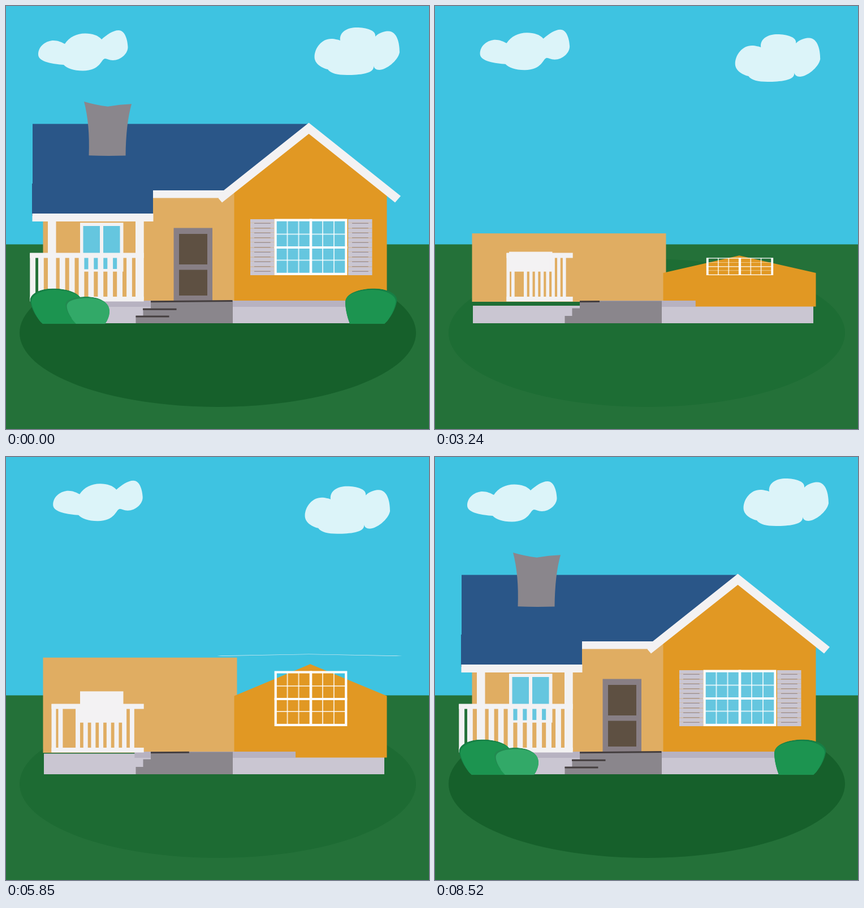
An HTML page with a canvas for the animation above (8.91 s loop, 748 by 748 pixels).

```html
<!DOCTYPE html>
<html lang="en">
<head>
<meta charset="utf-8">
<title>House</title>
<style>
html, body { margin: 0; width: 100%; height: 100%; overflow: hidden; background: #3ec3e1; }
canvas { display: block; }
</style>
</head>
<body>
<canvas id="stage" width="748" height="748"></canvas>
<script>
const ctx = document.getElementById('stage').getContext('2d');
const LOOP = 8910, STEP = 30;
const WHITE = '#f3f2f3', ROOF = '#2a5688', GLASS = '#65c6df', STONE = '#8a868c', BROWN = '#5e5042';

let now = 0; // build time: 0 is the empty lawn

const mix = (a, b, p) => a + (b - a) * p;
const lin = (from, to) => Math.min(1, Math.max(0, (now - from) / (to - from)));
const ease = (from, to) => (1 - Math.cos(Math.PI * lin(from, to))) / 2;

function box(color, l, t, r, b) {
  ctx.fillStyle = color;
  ctx.fillRect(l, t, r - l, b - t);
}

function poly(color, ...pts) {
  ctx.fillStyle = color;
  ctx.beginPath();
  for (let i = 0; i < pts.length; i += 2) ctx.lineTo(pts[i], pts[i + 1]);
  ctx.fill();
}

function shape(d) { return new Path2D(d); }

// Draw scaled about a fixed point
function scaled(x, y, sx, sy, draw) {
  if (sx <= 0 || sy <= 0) return;
  ctx.save();
  ctx.translate(x, y);
  ctx.scale(sx, sy);
  ctx.translate(-x, -y);
  draw();
  ctx.restore();
}

const cloudL = shape('M57 86C57 70 72 61 84 61C92 61 98 64 104 67C112 55 125 48.5 140 48.5C153 48.5 163 52 169 59C178 51 189 43 199 43C211 43 215 61 215.5 72C216 84 203 96 189 96C182 96 179 93 175 93C168 94 167 114.5 136 114.5C119 114.5 108 110 102 104C85 103 57 99 57 86Z');
const cloudR = shape('M545.5 90C546 73 559 58 575 58C582 58 588 60 591 61C589 45 605 38 620 38C637 38 655 43 653 54C660 47 669 44.5 676 44.5C692 45 696 66 696 82C693 97 672 113 660 113C654 113 651 110 650 106C652 120 624 122 603 122C586 122 574 119 569 112C556 109 545.5 101 545.5 90Z');
const bushBig = shape('M608 562C603 549 600 535 600 524C600 507 626 499.5 652 499.5C678 500 693 511 691.5 522C689 536 680 553 669 562Z');
const bushSmall = shape('M124 562C113 551 105 538 105 528C105 518 122 514 142 514C164 514 183 523 183 540C183 550 178 558 175 562Z');

function cloud(path, dx, dy) {
  ctx.save();
  ctx.translate(dx, dy);
  ctx.fillStyle = '#dcf4f9';
  ctx.fill(path);
  ctx.restore();
}

function scenery() {
  box('#3ec3e1', 0, 0, 748, 748);
  box('#247139', 0, 421.5, 748, 748);
  const p = lin(400, 2900);
  ctx.fillStyle = `rgb(${mix(33, 22, p)},${mix(115, 96, p)},${mix(56, 43, p)})`;
  ctx.beginPath();
  ctx.ellipse(374.5, 578, 350.5, 131, 0, 0, 7);
  ctx.fill();

  const a = 30 * ease(0, 1815) * (1 - ease(1815, 3630));
  cloud(cloudL, a < 0 ? 0 : now < 1815 ? 30 * ease(0, 1815) : 30 * (1 - ease(1815, 3630)), -a * 0.05);
  const c = 24.8 * (lin(0, 2043) - lin(2043, 3763));
  cloud(cloudR, -c, c * 0.81);
}

function walls() {
  box('#cac6d2', 67, 561 - 38 * ease(377, 1544), 669, 561);
  const wall = ease(611, 1687);
  box('#e0ad62', 65.5, 523 - 203 * wall, 408.5, 523);

  const roof = ease(1600, 2170);
  scaled(291, 326, 1.125 - 0.125 * roof, roof, () =>
    poly(ROOF, 47, 208.5, 535, 208.5, 388, 326, 47, 326));
  box(ROOF, 46, 314, 46 + 214 * ease(1823, 2823), 371);

  scaled(538, 531.5, 1, ease(802, 1945), () =>
    poly('#e19823', 403.5, 531.5, 403.5, 325.5, 538, 219.5, 673.5, 325.5, 673.5, 531.5));

  const strip = 303.5 * ease(617, 2237);
  box('#b7b2c1', 369.7 - strip, 521, 369.7 + strip, 532);
}

function stairs() {
  const p = ease(65, 965);
  scaled(315.4, 561, 0.75 + 0.25 * p, p, () =>
    poly(STONE, 229.5, 561, 229.5, 548, 242.5, 548, 242.5, 534.5, 256, 534.5, 256, 521.5, 401, 521.5, 401, 561));
}

function treads() {
  const tread = (x, y, w, rise, p) => {
    if (!p) return;
    ctx.strokeStyle = '#443e3f';
    ctx.lineWidth = 3;
    ctx.beginPath();
    ctx.moveTo(x, y);
    ctx.lineTo(x + w * p, y - rise * p);
    ctx.stroke();
  };
  tread(256, 522.8, 144.5, 1.2, ease(830, 2006));
  tread(242, 536.2, 59.5, 0, ease(1460, 2460));
  tread(229.5, 549, 59, 0, ease(2300, 2850));
}

function eaves() {
  box(WHITE, 388 - 128 * ease(1765, 2865), 326, 388, 339.5);
  const p = ease(1325, 2025);
  ctx.save();
  ctx.translate(0, 4.5 * (1 - p));
  scaled(536.5, 347.5, 1.015 - 0.015 * p, p, () =>
    poly(WHITE, 535.5, 206.5, 698, 336, 688, 347.5, 535.5, 226, 382, 347.5, 375.5, 340, 385, 326));
  ctx.restore();
  box(WHITE, 46.5, 381 - 14 * ease(2050, 2850), 260.5, 381);
}

function chimney() {
  const top = 265 - 90 * ease(2150, 3561), k = ease(2900, 4065);
  if (top > 264.9) return;
  const waist = mix(top, 265, 0.35);
  ctx.fillStyle = STONE;
  ctx.beginPath();
  ctx.moveTo(146.5, 264.3);
  ctx.quadraticCurveTo(147.5 + k, waist + 2, 147 - 9 * k, top - 6 * k);
  ctx.quadraticCurveTo(160 - 2 * k, top - 1 + k, 180, top + 2.8 * k);
  ctx.quadraticCurveTo(200 + k, top - 1, 211 + 11 * k, top + 0.8 - 2.5 * k);
  ctx.quadraticCurveTo(211 + k, waist + 2, 211.5, 264.5);
  ctx.quadraticCurveTo(178, 265.5, 146.5, 264.3);
  ctx.fill();
}

function bigWindow() {
  const p = ease(1089, 1425), g = ease(1500, 2200);
  if (g) for (const [l, r] of [[477, 538], [540, 601]]) box(GLASS, l, 474 - 95 * g, r, 474);
  scaled(539, 476, 0.88 + 0.12 * p, p, () => {
    const thin = 'rgba(255,255,255,.75)', bold = '#fdfdfd';
    for (const x of [497.5, 517.5, 560, 580]) box(thin, x - 1, 378, x + 1, 474);
    for (const y of [403.5, 449.5]) box(thin, 476, y - 1, 602, y + 1);
    box(bold, 536.7, 376.5, 541.3, 476);
    box(bold, 474.5, 425, 603.5, 429);
    ctx.strokeStyle = bold;
    ctx.lineWidth = 4.2;
    ctx.strokeRect(476.6, 378.6, 124.8, 95.3);
  });
}

function shutter(x) {
  const p = ease(1500, 2420);
  scaled(x, 377, p, 1, () => {
    let y = 377;
    for (let i = 0; i <= 11; i++) {
      const slat = i < 11 ? 383.7 + 8.5 * i : 476;
      box('#cac6d2', x, y, x + 42.5, slat);
      if (i < 11) {
        box('#cac6d2', x, slat, x + 7, slat + 1.3);
        box('#cac6d2', x + 35.5, slat, x + 42.5, slat + 1.3);
        box(now >= 2350 + 70 * i ? '#9791a0' : '#e19823', x + 7, slat, x + 35.5, slat + 1.3);
      }
      y = slat + 1.3;
    }
  });
}

function door() {
  box('#887f85', 296.5, 521 - 128.5 * ease(2150, 2800), 365, 521);
  box(BROWN, 306, 512 - 45.5 * ease(2480, 2880), 356, 512);
  box(BROWN, 306, 457 - 54 * ease(2895, 3500), 356, 457);
}

function porch() {
  box(WHITE, 131, 469.7 - 86.5 * ease(687, 1887), 207.5, 469.7);
  box(GLASS, 136.5, 389, 166, 389 + 76.5 * ease(1815, 2715));
  box(GLASS, 172, 465 - 76 * ease(2650, 3500), 201.5, 465);

  const col = 141 * ease(1650, 2750);
  box(WHITE, 74, 520 - col, 88.5, 520);
  box(WHITE, 229, 520 - col, 243.7, 520);

  scaled(243.7, 480, ease(595, 1717), 1, () => {
    box(WHITE, 42.3, 436.5, 243.7, 445.5);
    box(WHITE, 42.3, 514, 243.7, 522.5);
    for (const x of [42.3, 57]) box(WHITE, x, 437, x + 9.8, 522);
    for (let i = 0; i < 8; i++) {
      const x = 94.8 + 16.9 * i;
      box(WHITE, x, 437, x + 9.8, 522);
    }
  });
}

// Squash and stretch: flat and wide, then tall, then at rest
function bush(path, cx, start, pace, fill, edge, dx) {
  const u = (now - start) / pace;
  if (u <= 0) return;
  const part = (a, b) => (1 - Math.cos(Math.PI * Math.min(1, Math.max(0, (u - a) / (b - a))))) / 2;
  const tall = 1.39 * part(-0.1, 0.88) - 0.39 * part(0.9, 1.3);
  const wide = 1.14 - 0.15 * part(0, 0.9) + 0.01 * part(0.9, 1.3);
  ctx.save();
  ctx.translate(0, Math.max(0, wide - 1) * 14);
  scaled(cx, 561.5, wide, tall, () => {
    ctx.clip(path);
    ctx.fillStyle = edge;
    ctx.fill(path);
    ctx.translate(dx, 2.6);
    ctx.fillStyle = fill;
    ctx.fill(path);
    ctx.fillRect(cx - 32, 550, 64, 12);
  });
  ctx.restore();
}

function bushes() {
  bush(bushBig, 646, 1960, 1000, '#1c9450', '#167f45', -2.4);
  ctx.save();
  ctx.transform(-1, 0, 0, 1, 734, 0);
  bush(bushBig, 646, 2460, 1000, '#1c9450', '#167f45', -2.4);
  ctx.restore();
  bush(bushSmall, 144, 1420, 620, '#32a968', '#228a50', 2.6);
}

function draw(t) {
  now = Math.abs(LOOP / 2 - Math.floor((t % LOOP) / STEP) * STEP);
  scenery();
  walls();
  stairs();
  eaves();
  chimney();
  shutter(432);
  shutter(605);
  bigWindow();
  door();
  treads();
  porch();
  bushes();
}

const begin = performance.now();
function tick() {
  draw(performance.now() - begin);
  requestAnimationFrame(tick);
}
tick();
</script>
</body>
</html>
```
